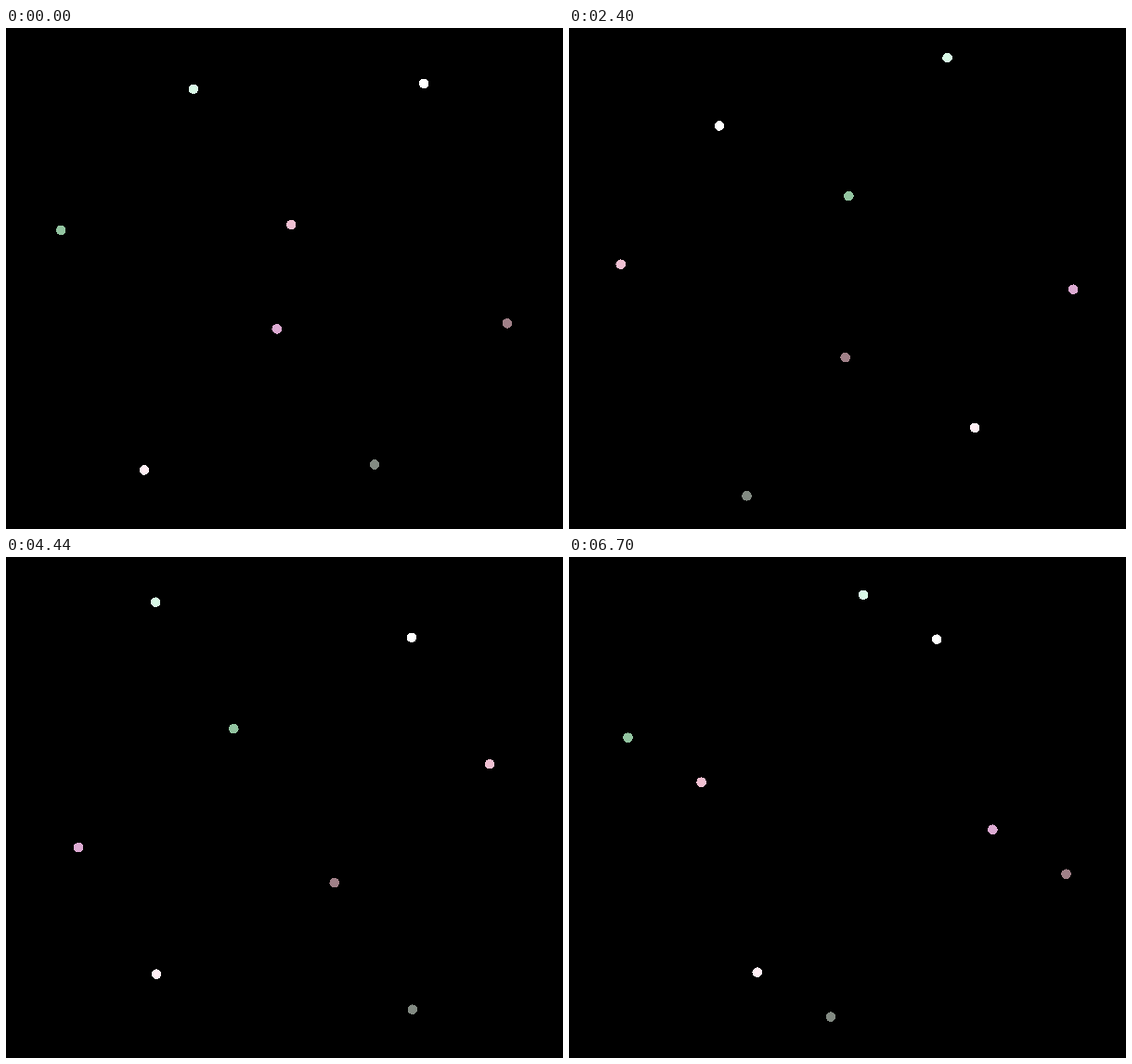
Write an HTML page that moves like this. It is 600 px wide and 540 px high and loops after 6720 ms.

```html
<!DOCTYPE html>
<html lang="en">
<head>
<meta charset="utf-8">
<title>Rotating cube corners</title>
<style>
  html, body { margin: 0; width: 100%; height: 100%; overflow: hidden; background: #000; }
  svg { display: block; width: 600px; height: 540px; }
</style>
</head>
<body>
<svg id="stage" viewBox="0 0 600 540" shape-rendering="crispEdges" xmlns="http://www.w3.org/2000/svg"></svg>
<script>
const LOOP = 6720, STEP = 20;
const CENTER = { x: 299.5, y: 268.2 }, HALF = 150, RADIUS = 5.3;
const COLORS = ['#d8f8e6', '#ffffff', '#92c4a0', '#f0c0d2', '#dcaad2', '#a08088', '#ffeef4', '#828a82'];

// Key poses: seconds, yaw in degrees, and the cube axes u, v along the screen's vertical
const POSES = [
  [0, 34.2, -0.02, 0.507],
  [0.68, 51.5, -0.013, 0.512],
  [1.36, 70.5, 0.008, 0.523],
  [1.8, 95.4, 0.167, 0.535],
  [3, 207.5, 0.238, 0.448],
  [4.44, 337.9, 0.127, 0.455],
  [5.44, 397.1, 0.133, 0.5],
  [6.7, 434.5, 0.16, 0.513]
];
const LAST = POSES.length - 1;

const rate = (i, k) => (POSES[i + 1][k] - POSES[i][k]) / (POSES[i + 1][0] - POSES[i][0]);

// Slope of the parabola through a pose and its neighbours
function slope(i, k) {
  const mid = Math.min(Math.max(i, 1), LAST - 1);
  const before = rate(mid - 1, k), after = rate(mid, k);
  const bend = (after - before) / (POSES[mid + 1][0] - POSES[mid - 1][0]);
  const inner = before + bend * (POSES[mid][0] - POSES[mid - 1][0]);
  return inner + 2 * bend * (POSES[i][0] - POSES[mid][0]);
}

// Smooth cubic path through column k of the poses
function follow(k, t) {
  let i = 0;
  while (i < LAST - 1 && t > POSES[i + 1][0]) i++;
  const span = POSES[i + 1][0] - POSES[i][0];
  const s = (t - POSES[i][0]) / span, r = 1 - s;
  return r * r * (1 + 2 * s) * POSES[i][k] + s * s * (3 - 2 * s) * POSES[i + 1][k]
    + span * s * r * (r * slope(i, k) - s * slope(i + 1, k));
}

// Screen directions expressed in cube axes
function screenAxes(t) {
  const yaw = follow(1, t) * Math.PI / 180, c = Math.cos(yaw), s = Math.sin(yaw);
  const u = follow(2, t), v = follow(3, t);
  const w = Math.sqrt(1 - u * u - v * v), n = Math.hypot(v, w);
  return {
    x: [c * n, (-c * u * v - s * w) / n, (-c * u * w + s * v) / n],
    y: [u, v, w]
  };
}

const stage = document.getElementById('stage');
const dots = COLORS.map((color, i) => {
  const node = document.createElementNS('http://www.w3.org/2000/svg', 'circle');
  node.setAttribute('r', RADIUS);
  node.setAttribute('fill', color);
  stage.appendChild(node);
  return { node, corner: [0, 1, 2].map(bit => (i >> bit & 1 ? HALF : -HALF)) };
});

const project = (axis, p) => axis[0] * p[0] + axis[1] * p[1] + axis[2] * p[2];

function draw(ms) {
  const t = Math.floor((ms % LOOP) / STEP) * STEP / 1000;
  const axes = screenAxes(t);
  for (const { node, corner } of dots) {
    node.setAttribute('cx', (CENTER.x + project(axes.x, corner)).toFixed(2));
    node.setAttribute('cy', (CENTER.y + project(axes.y, corner)).toFixed(2));
  }
}

const start = performance.now();
function tick() {
  draw(performance.now() - start);
  requestAnimationFrame(tick);
}
tick();
</script>
</body>
</html>
```
